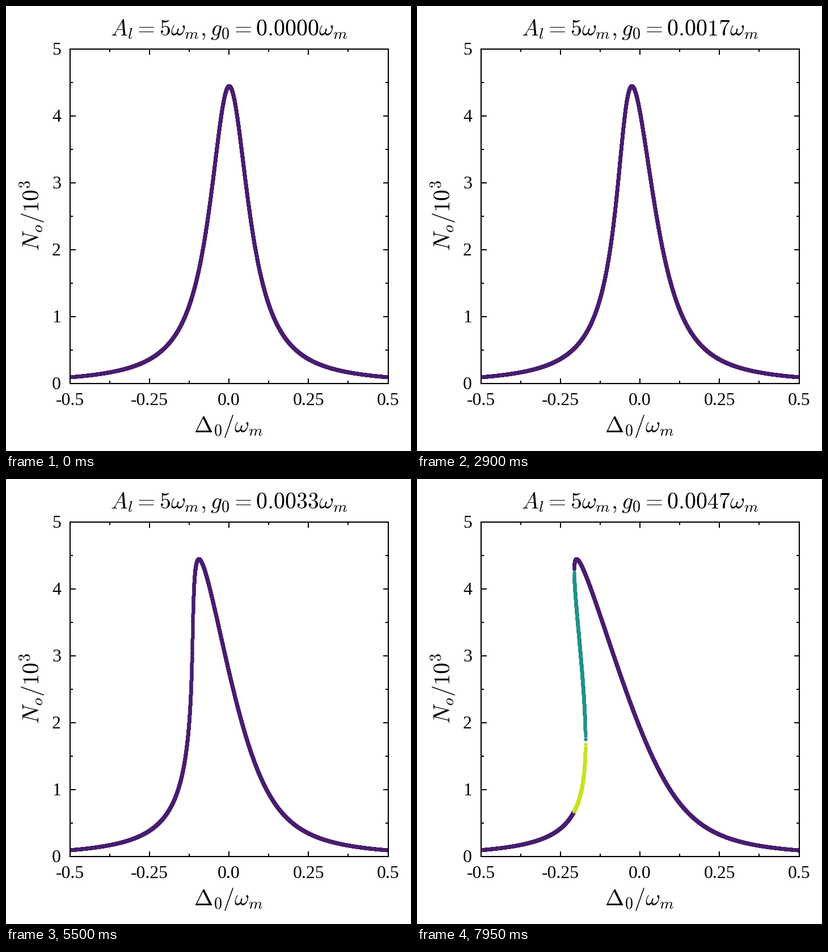
Write a matplotlib script that moves like this. It is 714 px wide and 785 px high and loops after 8000 ms.

```python
import numpy as np
import matplotlib.pyplot as plt
from matplotlib.animation import FuncAnimation
from matplotlib.ticker import MultipleLocator

W, H, DPI = 714, 785, 64
LEFT, RIGHT, TOP, BOTTOM = 112.5, 673.5, 75.5, 666
MATH_SIZE, TICK_SIZE = 40, 31.7
FRAMES, INTERVAL = 160, 50

DRIVE = 5.0        # laser amplitude
HALF_KAPPA = 0.075  # half the cavity linewidth
G_STEP = 3e-5
DETUNING = np.linspace(-0.5, 0.5, 10001)

plt.rcParams["mathtext.fontset"] = "cm"


def pt(px):
    return px * 72 / DPI


def photon_branches(g):
    """Steady-state photon numbers (in thousands): outer, middle and lower branch."""
    d = DETUNING
    k2 = HALF_KAPPA ** 2
    # cubic for the effective detuning u = d + 2 g^2 N, shifted by d / 3
    p = k2 - d ** 2 / 3
    q = -2 * d ** 3 / 27 - 2 * d * k2 / 3 - 2 * g ** 2 * DRIVE ** 2
    disc = (q / 2) ** 2 + (p / 3) ** 3
    one = disc > 0

    root = np.sqrt(disc[one])
    single = np.cbrt(-q[one] / 2 + root) + np.cbrt(-q[one] / 2 - root)
    p3, q3 = p[~one], q[~one]
    angle = np.arccos(np.clip(1.5 * q3 / p3 * np.sqrt(-3 / p3), -1, 1))

    def number(t, det):
        return DRIVE ** 2 / (k2 + (t + det / 3) ** 2) / 1000

    triple = [number(2 * np.sqrt(-p3 / 3) * np.cos((angle - 2 * np.pi * k) / 3), d[~one])
              for k in range(3)]
    outer = np.empty_like(d)
    outer[one] = number(single, d[one])
    outer[~one] = triple[0]
    return (d, outer), (d[~one], triple[1]), (d[~one], triple[2])


fig = plt.figure(figsize=(W / DPI, H / DPI), dpi=DPI, facecolor="white")
ax = fig.add_axes([LEFT / W, 1 - BOTTOM / H, (RIGHT - LEFT) / W, (BOTTOM - TOP) / H])
ax.set_xlim(-0.5, 0.5)
ax.set_ylim(0, 5)
for axis, major in ((ax.xaxis, 0.25), (ax.yaxis, 1)):
    axis.set_major_locator(MultipleLocator(major))
    axis.set_minor_locator(MultipleLocator(major / 2))
ax.tick_params(which="both", direction="in", top=True, right=True, width=pt(2),
               labelbottom=False, labelleft=False)
ax.tick_params(which="major", length=pt(9.5))
ax.tick_params(which="minor", length=pt(5))
for spine in ax.spines.values():
    spine.set_linewidth(pt(2.1))


def label(x, y, text, size=MATH_SIZE, **kw):
    kw = {"ha": "center", "va": "baseline", **kw}
    return fig.text(x / W, 1 - y / H, text, fontsize=pt(size), color="black", **kw)


def tick_label(x, y, text, **kw):
    label(x, y, text, TICK_SIZE, family="Liberation Serif", **kw)


for i, text in enumerate(("-0.5", "-0.25", "0.0", "0.25", "0.5")):
    tick_label(LEFT + (RIGHT - LEFT) * i / 4, 703.5, text)
for i in range(6):
    tick_label(97, BOTTOM - (BOTTOM - TOP) * i / 5 + 10.5, str(i), ha="right")

label(392.5, 752, r"$\Delta_0/\omega_m$")
label(59, 370, r"$N_o/10^3$", rotation=90, rotation_mode="anchor")
title = label(393, 52, "")

cmap = plt.get_cmap("viridis")
dots = [ax.plot([], [], "o", ms=pt(6.4), mew=0, color=cmap(c))[0]
        for c in (0.08, 0.5, 0.92)]


def draw(i):
    g = G_STEP * max(0, i - 1)
    for line, (x, y) in zip(dots, photon_branches(g)):
        line.set_data(x, y)
    title.set_text(rf"$A_l=5\omega_m,g_0={g:.4f}\omega_m$")
    return [*dots, title]


anim = FuncAnimation(fig, draw, frames=FRAMES, interval=INTERVAL, init_func=lambda: draw(0),
                     repeat=True, repeat_delay=0, blit=False)
plt.show()
```
